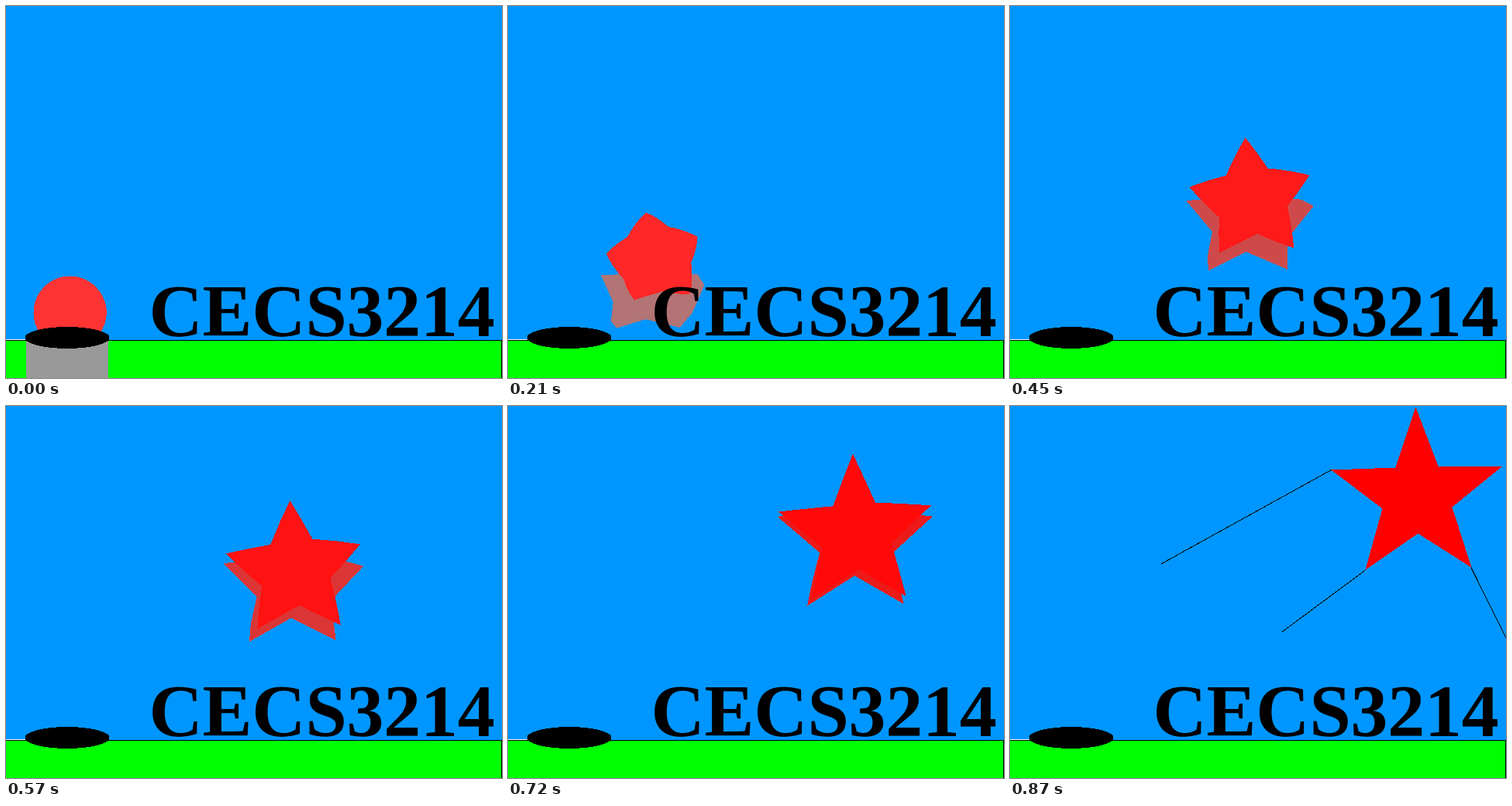
Write an HTML page that moves like this. It is 640 by 480 pixels and loops after 900 ms.

```html
<!DOCTYPE html>
<html lang="en">
<head>
<meta charset="utf-8">
<title>Ball to star</title>
<style>
  html, body { margin: 0; width: 100%; height: 100%; overflow: hidden; background: #fff; }
  svg { display: block; width: 640px; height: 480px; }
  text { font: bold 96px "Liberation Serif", "Times New Roman", serif; letter-spacing: -0.25px; }

  /* 30 poses of 30 ms; the tiny delay keeps step edges clear of rounding */
  .ball { animation: ball 900ms steps(30, jump-none) -0.5ms infinite; }
  .can { animation: can 900ms steps(30, jump-none) -0.5ms infinite; }
  .trails { animation: trails 900ms step-end -0.5ms infinite; }

  @keyframes ball {
    from {
      fill: #f33;
      d: path("M67.5 350.3 Q82 345.6 96.5 350.3 Q111 355 120 367.4 Q129 379.7 129.5 395 Q129 410.3 120 422.6 Q111 432 97 432 Q83 432 68.5 432 Q53 432 44 422.6 Q35 410.3 35 395 Q35 379.7 44 367.4 Q53 355 67.5 350.3 Z");
    }
    to {
      fill: #f00;
      d: path("M523 1 Q537.5 39 552 77 Q593 77.5 634 78 Q602 104 570 130 Q582.5 169 595 208 Q560.5 186 526 164 Q492 187.5 458 211 Q469 171.5 480 132 Q447 107 414 82 Q455.5 80.5 497 79 Q510 40 523 1 Z");
    }
  }
  @keyframes can {
    from {
      fill: #999;
      d: path("M70 430.5 L98 430.5 L131.5 430.5 L131.5 449.5 L131.5 480 L102.5 480 L66 480 L38.5 480 L25.5 480 L25.5 461 L25.5 430.5 L45 430.5 Z");
    }
    to {
      fill: #f00;
      d: path("M523 1 L552 77 L597 78 L634 78 L570 130 L595 208 L526 164 L458 211 L468 175 L480 132 L414 82 L497 79 Z");
    }
  }
  @keyframes trails {
    0% { opacity: 0; }
    96.667%, 100% { opacity: 1; }
  }
</style>
</head>
<body>
<svg viewBox="0 0 640 480" shape-rendering="crispEdges">
  <rect width="640" height="431" fill="#0096ff"/>
  <rect y="430" width="25" height="1" fill="#fff"/>
  <rect y="431" width="640" height="49"/>
  <rect y="432" width="639" height="48" fill="#0f0"/>
  <g transform="translate(.5 .5)">
    <path class="can"/>
    <path class="ball"/>
    <ellipse cx="78.5" cy="427.5" rx="54.5" ry="14"/>
  </g>
  <path class="trails" d="M195.5 203.5 L414.5 82.5 M351 291.5 L459 211.5 M595 208.5 L640 299" fill="none" stroke="#000"/>
  <text x="184.5" y="426">CECS3214</text>
</svg>
</body>
</html>
```
